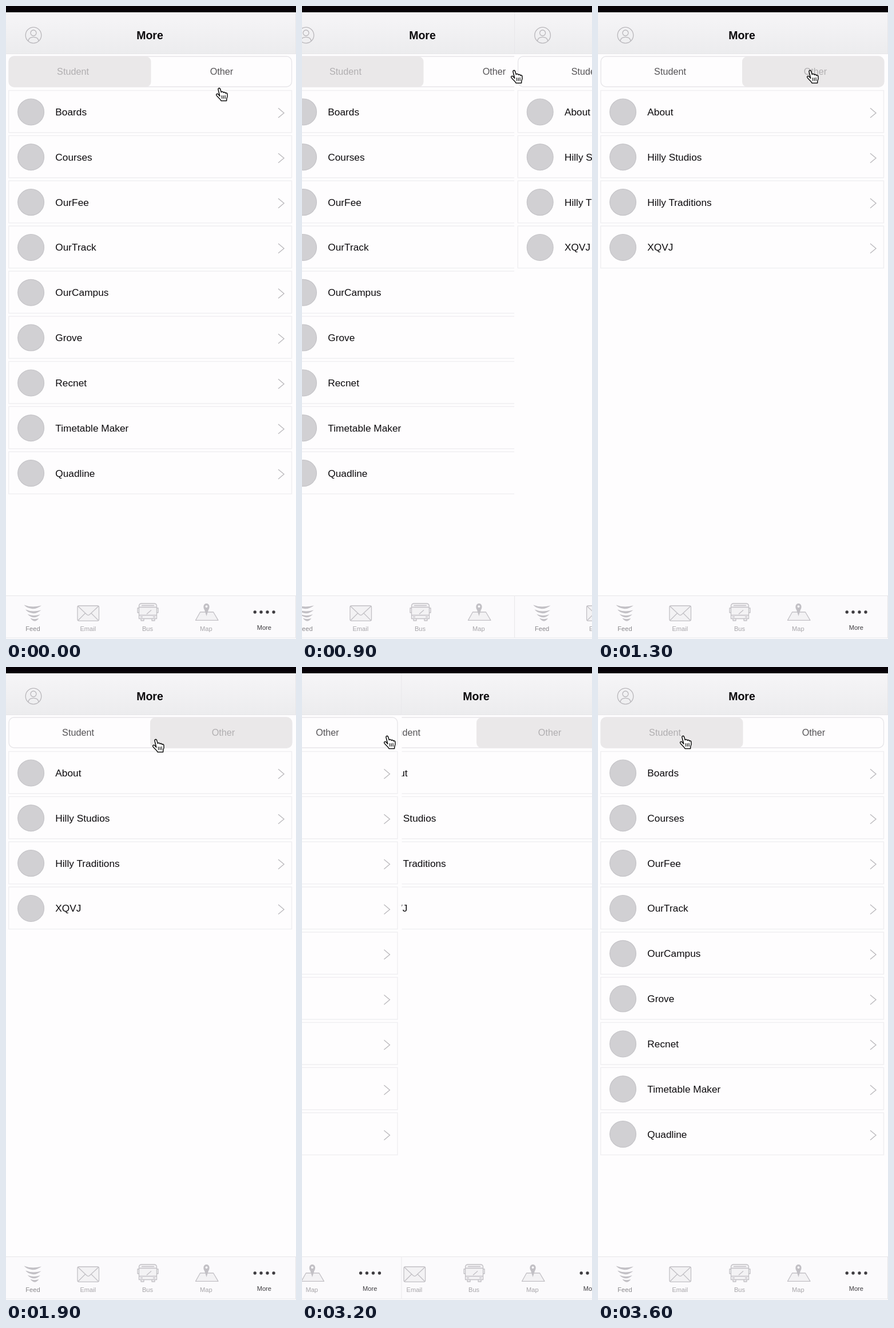
These frames come from a looping animation (507 by 1105 pixels, 4500 ms). An HTML page:

```html
<!DOCTYPE html>
<html lang="en">
<head>
<meta charset="utf-8">
<title>More menu</title>
<style>
html, body { margin: 0; width: 100%; height: 100%; overflow: hidden; background: #fefdfe; }
svg { display: block; width: 100%; height: 100%; }
text { font: 17.3px "Liberation Sans", Arial, sans-serif; fill: #0b090c; }
.mid { text-anchor: middle; }
.title { font-size: 19.5px; font-weight: bold; }
.tab { font-size: 16.2px; fill: #555356; }
.tab.off { fill: #b0aeb0; }
.label { font-size: 11.1px; fill: #a7a5a9; }
.feed { fill: #89878b; }
.dark { fill: #3e3c40; }
.line { fill: none; stroke: #b9b7bb; stroke-width: 1.3; }
.icon { fill: #f3f2f4; stroke: #c2c0c5; stroke-width: 1.3; stroke-linejoin: round; }
.solid { fill: #c2c0c5; }
.row { fill: #fefdfe; stroke: #efeef1; stroke-width: 1.4; }
.frame { fill: none; stroke: #e7e6e9; }
</style>
</head>
<body>
<svg viewBox="0 0 507 1105">
  <defs>
    <linearGradient id="header" x2="0" y2="1">
      <stop stop-color="#f6f5f7"/><stop offset="1" stop-color="#ececee"/>
    </linearGradient>
    <g id="bars">
      <rect x="-1.500" y="11" width="508.500" height="72.500" fill="url(#header)"/>
      <path class="frame" d="M-1.500 83.500H507M-1 11V83M506.500 11V83"/>
      <g class="line">
        <circle cx="48" cy="51" r="13.800"/>
        <circle cx="48" cy="47" r="5"/>
        <path d="M39 61C39.500 56.500 43 54.300 48 54.300S56.500 56.500 57 61"/>
      </g>
      <text class="mid title" x="251.500" y="57.800">More</text>

      <rect class="frame" x="-1" y="1029.500" width="507.500" height="73.500" style="fill:#fbfafc"/>
      <g class="solid">
        <path d="M31.500 1045.500Q45 1051 62 1046.500Q54 1052.700 46 1052.200Q36 1051 31.500 1045.500Z"/>
        <path d="M34 1053.500Q46 1058.800 61.500 1054.500Q54 1060.700 47.500 1060.200Q38 1059 34 1053.500Z"/>
        <path d="M37.500 1061.500Q47 1066 60 1062Q54 1067.700 48.500 1067.300Q42 1066.500 37.500 1061.500Z"/>
        <path d="M42.500 1068.500Q49 1071.500 57.500 1069Q53.500 1074 50 1073.800Q45.500 1073 42.500 1068.500Z"/>
      </g>
      <g class="icon">
        <rect x="125" y="1047" width="37.500" height="26.300" rx="2.500"/>
        <path fill="none" d="M126 1048L141.500 1062.500Q143.800 1064.300 146 1062.500L161.500 1048M126 1072.500L138.500 1060M161.500 1072.500L149 1060"/>
        <path d="M236 1069V1073H241V1069M255 1069V1073H260V1069M232 1051H230V1059H232M264 1051H266V1059H264"/>
        <path d="M232.500 1069.500V1047Q233 1043 237 1043H259Q263 1043 263.500 1047V1069.500Z"/>
        <path d="M232.500 1049.500H263.500M232.500 1063.500H263.500M237 1046.500H259M246 1061.500L254 1054.500M235 1066.500H239M257 1066.500H261"/>
        <path d="M339.500 1058H362.500L371 1072.300H331.500Z"/>
      </g>
      <path class="solid" fill-rule="evenodd" d="M350.500 1065L347 1054C344 1050 345 1043 350.500 1043S357 1050 354 1054ZM350.500 1046.200A2 2 0 0 0 350.500 1050.200A2 2 0 0 0 350.500 1046.200Z"/>
      <g class="dark">
        <circle cx="435.200" cy="1058" r="2.700"/><circle cx="446" cy="1058" r="2.700"/>
        <circle cx="457" cy="1058" r="2.700"/><circle cx="468" cy="1058" r="2.700"/>
      </g>
      <text class="mid label feed" x="47" y="1091.300">Feed</text>
      <text class="mid label" x="143.300" y="1091.300">Email</text>
      <text class="mid label" x="247.500" y="1091.300">Bus</text>
      <text class="mid label" x="349.800" y="1091.300">Map</text>
      <text class="mid label dark" x="451.300" y="1089">More</text>
    </g>
  </defs>
  <g id="pages"></g>
  <rect width="507" height="11" fill="#050106"/>
  <g id="cursor" stroke="#111" stroke-width="1.500" stroke-linejoin="round" stroke-linecap="round">
    <path fill="#fff" d="M-3.200 3.200L-6 -8C-6.600 -10.900 -3.300 -11.600 -2.400 -9L-.7 -3.600C.3 -5 2.800 -4.700 3.200 -2.800C4.200 -4.100 6.300 -3.600 6.800 -1.800C8.100 -2.700 9.600 -2 9.900 -.4C10.500 3 10.300 5 8.800 7.800L8.600 11.400H-1C-2.200 8.400 -6.200 5.800 -8.800 2.400C-10.600 -.2 -7.600 -1.600 -5.800 .2Z"/>
    <path fill="none" stroke-width="1.200" d="M.2 2.700L.8 7.300M3.100 2.500L3.600 7.300M6 2.200L6.300 7.300"/>
  </g>
</svg>
<script>
const WIDTH = 507, LOOP = 4500, STEP = 100, PARALLAX = 0.302;
const pages = document.getElementById('pages');
const cursor = document.getElementById('cursor');

function row(name, i) {
  return `<g transform="translate(0 ${i * 78.83})">
    <rect class="row" x="4.700" y="147.500" width="494.800" height="73.500"/>
    <circle cx="43.600" cy="184.900" r="22.900" fill="#d1d0d3" stroke="#c5c4c8" stroke-width="1.200"/>
    <text x="86.300" y="191">${name}</text>
    <path class="line" d="M476 178.300L486 186.700L476 195"/>
  </g>`;
}

function makePage(names, studentSelected) {
  const page = document.createElementNS('http://www.w3.org/2000/svg', 'g');
  const [studentX, otherX, selectedX] = studentSelected ? [117, 377, 5] : [126, 380, 252];
  page.innerHTML = `<rect x="-1.500" y="11" width="508.500" height="1094" fill="#fefdfe"/>
    <use href="#bars"/>
    <rect class="frame" x="5" y="88" width="494.500" height="53" rx="9" stroke-width="1.400"/>
    <rect x="${selectedX}" y="88" width="248.500" height="53.500" rx="9" fill="#eae8e9"/>
    <text class="mid tab ${studentSelected ? 'off' : ''}" x="${studentX}" y="119.800">Student</text>
    <text class="mid tab ${studentSelected ? '' : 'off'}" x="${otherX}" y="119.800">Other</text>
    ${names.map(row).join('')}`;
  return page;
}

const student = makePage(['Boards', 'Courses', 'OurFee', 'OurTrack', 'OurCampus',
  'Grove', 'Recnet', 'Timetable Maker', 'Quadline'], true);
const other = makePage(['About', 'Hilly Studios', 'Hilly Traditions', 'XQVJ'], false);

const clamp = v => Math.max(0, Math.min(1, v));
const mix = (a, b, p) => a + (b - a) * p;
const smooth = p => p * p * (3 - 2 * p);
const span = (t, start, end) => clamp((t - start) / (end - start));

// Cubic Bézier (.25, .1, .25, 1), solved for x by bisection.
function ease(x) {
  if (x <= 0 || x >= 1) return clamp(x);
  const curve = (a, b, s) => 3 * a * s * (1 - s) ** 2 + 3 * b * s * s * (1 - s) + s ** 3;
  let low = 0, high = 1;
  for (let i = 0; i < 24; i++) {
    const s = (low + high) / 2;
    if (curve(.25, .25, s) < x) low = s; else high = s;
  }
  return curve(.1, 1, low);
}

function slide(from, to, direction, p) {
  pages.replaceChildren(from, to);
  from.setAttribute('transform', `translate(${-direction * WIDTH * PARALLAX * p} 0)`);
  to.setAttribute('transform', `translate(${direction * (WIDTH + 2) * (1 - p)} 0)`);
}

function cursorAt(t) {
  if (t < 1600) {
    const p = smooth(span(t, 0, 500));
    return [mix(377, 375, p), mix(154, 123, p)];
  }
  if (t <= 2200) {
    const p = smooth(span(t, 1600, 2200));
    return [mix(375, 157, p), mix(123, 133, p) + 9 * Math.sin(Math.PI * p)];
  }
  const p = span(t, 2200, 2400);
  return [mix(157, 153, p), mix(133, 131, p)];
}

function draw(now) {
  const t = Math.floor(now % LOOP / STEP) * STEP;
  if (t < 3100) slide(student, other, 1, t < 900 ? 0 : ease(span(t, 825, 1224)));
  else slide(other, student, -1, t < 3200 ? 0 : ease(span(t, 3111, 3511)));
  cursor.setAttribute('transform', `translate(${cursorAt(t)})`);
}

const start = performance.now();
function tick() {
  draw(performance.now() - start);
  requestAnimationFrame(tick);
}
tick();
</script>
</body>
</html>
```
